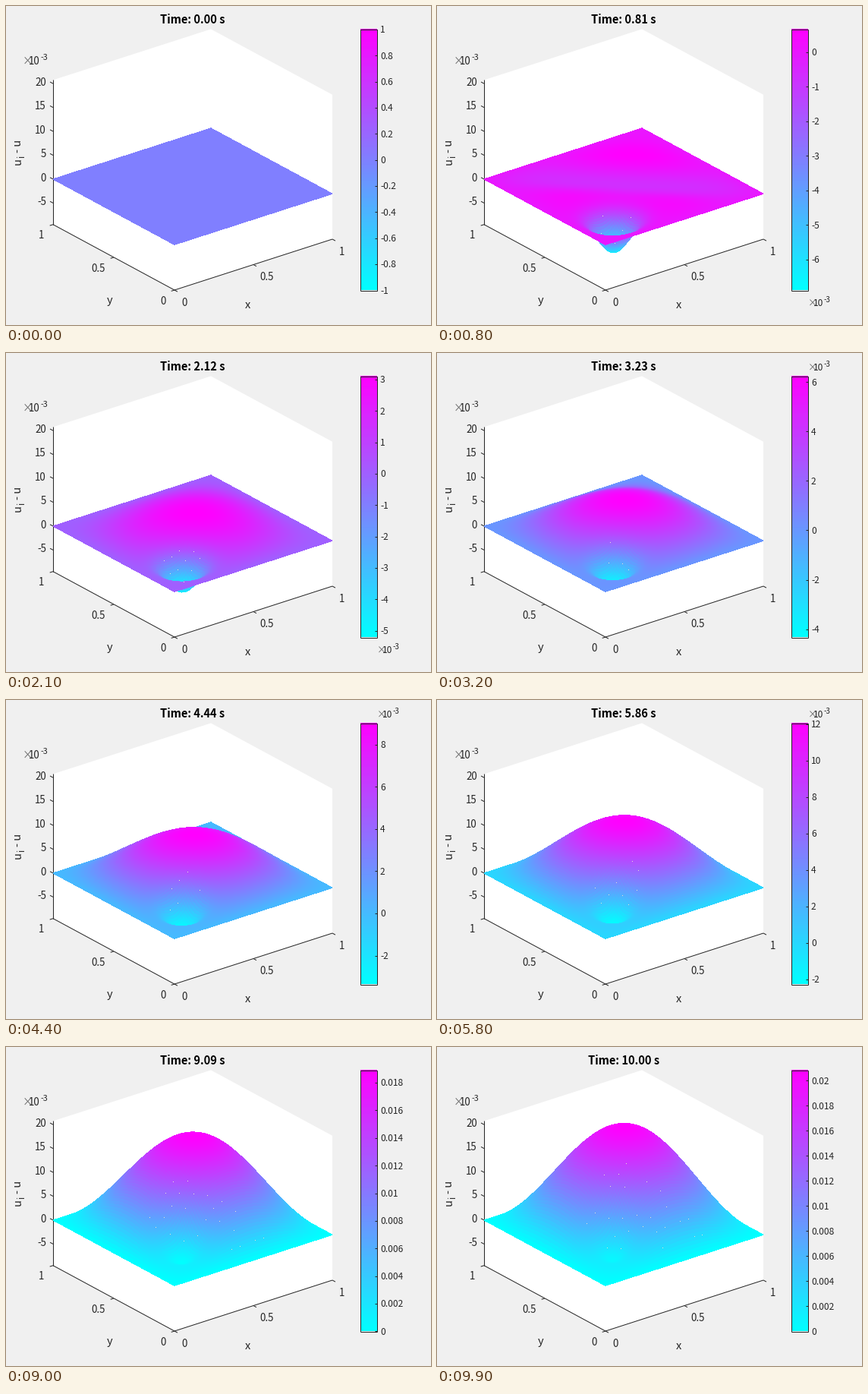
Write a matplotlib script that moves like this. It is 560 px wide and 420 px high and loops after 10 s.

```python
import numpy as np
import matplotlib.pyplot as plt
from matplotlib.animation import FuncAnimation
from matplotlib.colors import LinearSegmentedColormap

W, H, FRAMES = 560, 420, 100
INK = "#262626"
ORIGIN = np.array([222, 374])
EX, EY = np.array([208, -67]), np.array([-160, -86.3])
Z_PX, Z_LO, Z_HI = 6.29, -9.5, 20.75      # heights are in units of 1e-3
BAR_L, BAR_R, BAR_T, BAR_B = 467, 489, 31, 374.5

plt.rcParams["font.family"] = ["Noto Sans CJK JP", "DejaVu Sans"]
cool = LinearSegmentedColormap.from_list("cm", [(0, 1, 1), (1, 0, 1)], 256)

fig = plt.figure(figsize=(W / 100, H / 100), dpi=100, facecolor="#f0f0f0")
ax = fig.add_axes([0, 0, 1, 1])
ax.set_xlim(0, W)
ax.set_ylim(H, 0)
ax.axis("off")

# Far corner first, so that the mesh paints back to front.
side = np.linspace(1, 0, 101)
X, Y = np.meshgrid(side, side)
SIN = np.clip(np.sin(np.pi * X) * np.sin(np.pi * Y), 0, None)
R2 = (X - 0.19) ** 2 + (Y - 0.19) ** 2
NARROW = np.exp(-R2 / (2 * 0.085 ** 2))
WIDE = np.exp(-R2 / (2 * 0.22 ** 2))


def project(x, y, z):
    px = ORIGIN[0] + EX[0] * x + EY[0] * y
    py = ORIGIN[1] + EX[1] * x + EY[1] * y - Z_PX * (z - Z_LO)
    return px, py


def height(t):
    """Growing hump, settling dip near the corner and a passing trough."""
    fast = (1 - np.exp(-t / 0.07)) * (1 + 1.3 * np.exp(-t / 0.45))
    slow = 1 - np.exp(-t)
    dip = 19.3 * (0.8 * fast * NARROW + 0.2 * slow * WIDE)
    trough = 18.1 * t ** 2 * np.exp(-t / 0.493)
    front = np.exp(-0.5 * ((X + Y - 1.1) / (0.12 + 0.1 * t)) ** 2)
    return SIN * (2.13 * t - dip) - trough * front * SIN ** 0.6


def text(x, y, s, px, ha="center", **kw):
    """Text whose digits are centred on y; px is the font size in pixels."""
    kw.setdefault("color", INK)
    return ax.text(x, y + 0.36 * px, s, fontsize=px * 0.72, ha=ha,
                   va="baseline", zorder=5, **kw)


def power(x, y, px):
    return [text(x, y, "×", px, "left", color="#6a6a6a"),
            text(x + 0.62 * px, y, "10", px, "left"),
            text(x + 1.75 * px, y - 0.36 * px, "-3", px * 0.82, "left")]


def line(p, q, z=1):
    return ax.plot([p[0], q[0]], [p[1], q[1]], color=INK, lw=0.72, zorder=z,
                   solid_capstyle="butt")[0]


def tick(p, along, size=4.5):
    p = np.array(p)
    line(p, p + size * along / np.hypot(*along))


def draw_box():
    hull = [project(*c) for c in [(0, 1, Z_LO), (0, 0, Z_LO), (1, 0, Z_LO),
                                  (1, 0, Z_HI), (1, 1, Z_HI), (0, 1, Z_HI)]]
    ax.fill(*zip(*hull), color="white", lw=0, zorder=0)
    line(hull[0], hull[1])
    line(hull[1], hull[2])
    line(hull[0], hull[5])
    for v in (0, 0.5, 1):
        px, py = project(v, 0, Z_LO)
        tick((px, py), -EY)
        text(px + 13 + 5 * (v == 0.5), py + 16, f"{v:g}", 13.33)
        px, py = project(0, v, Z_LO)
        tick((px, py), -EX)
        text(px - 15 - 5 * (v == 0.5), py + 14, f"{v:g}", 13.33)
    for v in range(-5, 21, 5):
        p = project(0, 1, v)
        tick(p, EY)
        text(53, p[1] - 2, f"{v}", 13.33, "right")
    power(22, 72, 13.33)
    text(318, 392.5, "x", 14.67)
    text(137, 386.5, "y", 14.67)
    for x, y, s, px in ((20, 209, "u", 14.67), (24, 200, "i", 11.7),
                        (20, 193, "- u", 14.67)):
        ax.text(x, y, s, fontsize=px * 0.72, color=INK, rotation=90,
                rotation_mode="anchor", ha="left", va="baseline")


def draw_bar():
    ax.imshow(np.linspace(1, 0, 256)[:, None], cmap=cool, aspect="auto",
              extent=(BAR_L, BAR_R, BAR_B, BAR_T), zorder=1)
    ax.set_xlim(0, W)
    ax.set_ylim(H, 0)
    corners = [(BAR_L, BAR_T), (BAR_R, BAR_T), (BAR_R, BAR_B), (BAR_L, BAR_B)]
    for p, q in zip(corners, corners[1:] + corners[:1]):
        line(p, q, 2)


draw_box()
draw_bar()
title = text(246, 18, "", 14.67, weight="bold")
title.set_color("black")
sparks, = ax.plot([], [], ",", color="#e6e2d2", zorder=4)
temp = []


def label_bar(lo, hi, t):
    plain = t == 0 or t > 8.95
    if t == 0:
        step, unit = 0.2, 1
    else:
        step, unit = (1 if hi - lo <= 10 else 2), (1e-3 if plain else 1)
    first = np.ceil(lo / step - 1e-6)
    last = np.floor(hi / step + 1e-6)
    for k in np.arange(first, last + 1):
        v = k * step
        y = BAR_B - (v - lo) / (hi - lo) * (BAR_B - BAR_T)
        temp.append(line((BAR_R - 3, y), (BAR_R, y), 3))
        temp.append(text(493, y, f"{round(v * unit, 4) + 0.0:g}", 12, "left"))
    if not plain:
        temp.extend(power(489, 391 if -lo > hi else 19, 12))


def place_sparks(z, px, py, i):
    """Pale pinholes on mesh nodes of the slope facing the viewer."""
    gy, gx = np.gradient(z, -0.01)
    facing = 0.61 * gx + 0.79 * gy
    nodes = np.zeros(z.shape, bool)
    nodes[5:-5:5, 5:-5:5] = True
    keep = np.random.default_rng(i).random(z.shape) < 0.65
    mask = nodes & keep & (facing > max(0.5 * facing.max(), 6))
    sparks.set_data(px[mask], py[mask])


def draw(i):
    while temp:
        temp.pop().remove()
    t = i * 10 / (FRAMES - 1)
    z = height(t)
    lo, hi = (-1, 1) if i == 0 else (z.min(), z.max())
    px, py = project(X, Y, z)
    cell = (z[1:, 1:] + z[:-1, 1:] + z[1:, :-1] + z[:-1, :-1]) / 4
    temp.append(ax.pcolormesh(px, py, cell, cmap=cool, vmin=lo, vmax=hi,
                              antialiased=False, snap=False, zorder=2))
    place_sparks(z, px, py, i)
    label_bar(lo, hi, t)
    title.set_text(f"Time: {t:.2f} s")
    return []


anim = FuncAnimation(fig, draw, frames=FRAMES, interval=100, repeat=True)
plt.show()
```
